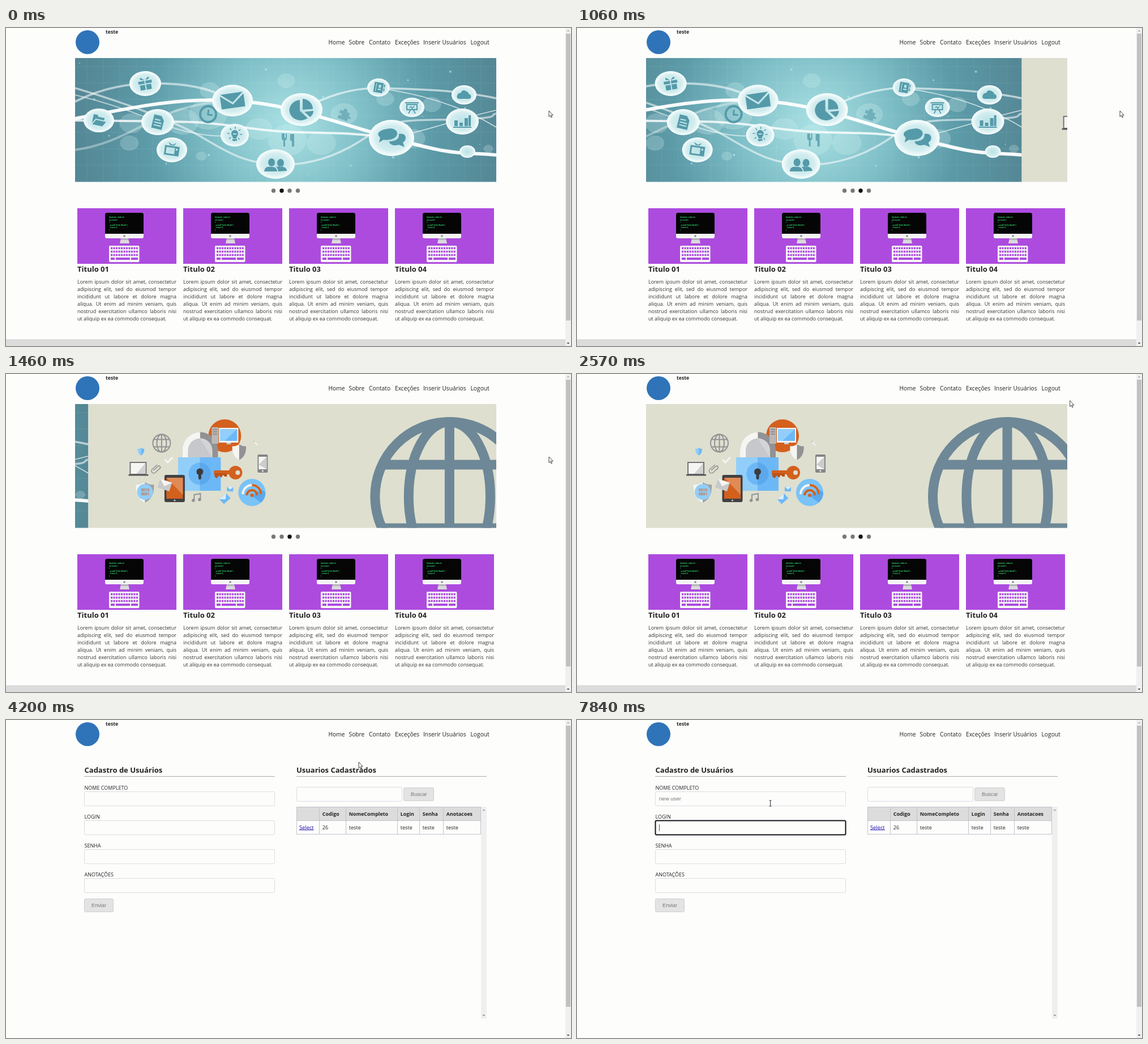
An HTML page that plays this animation: 998 by 561 pixels, repeating every 8 s.

```html
<!DOCTYPE html>
<html lang="pt">
<head>
<meta charset="utf-8">
<style>
html, body { margin: 0; width: 100%; height: 100%; overflow: hidden; background: #fdfdfc; }
svg { position: absolute; left: 0; top: 0; font-family: "Open Sans", sans-serif; fill: #222; }
p { position: absolute; top: 441px; width: 175px; margin: 0; font: 9px/13px "Open Sans", sans-serif; color: #333; text-align: justify; }
.title { font-size: 13px; font-weight: 700; }
.button { font: 9.2px "Liberation Sans", Arial, sans-serif; fill: #777; }
</style>
</head>
<body>
<div id="home"></div>
<svg id="form" width="998" height="561"></svg>
<svg id="top" width="998" height="561"></svg>
<script>
const $ = id => document.getElementById(id);
const rect = (x, y, w, h, fill, more = '') => `<rect x="${x}" y="${y}" width="${w}" height="${h}" fill="${fill}" ${more}/>`;
const disc = (x, y, r, fill, more = '') => `<circle cx="${x}" cy="${y}" r="${r}" fill="${fill}" ${more}/>`;
const path = (d, fill, more = '') => `<path d="${d}" fill="${fill}" ${more}/>`;
const line = (d, color, width, more = '') => path(d, 'none', `stroke="${color}" stroke-width="${width}" ${more}`);
const text = (x, y, s, size, more = '') => `<text x="${x}" y="${y}" font-size="${size}" ${more}>${s}</text>`;
const at = (x, y, body, turn = 0) => `<g transform="translate(${x} ${y}) rotate(${turn})">${body}</g>`;

function globe(x, y, r, w, color) {
  const R = r - w / 2, h = r * .4, c = Math.sqrt(R * R - h * h);
  return at(x, y, `<g fill="none" stroke="${color}" stroke-width="${w}"><circle r="${R}"/>
    <ellipse rx="${r * .515}" ry="${R}"/><path d="M0-${R}V${R}M-${c}-${h}H${c}M-${c} ${h}H${c}"/></g>`);
}

// Network slide
const INK = '#559aa9';
const orb = (x, y, rx, ry, icon = '', turn = 0) =>
  at(x, y, `<ellipse rx="${rx}" ry="${ry}" fill="url(#orb)"/>` +
    `<g transform="rotate(${turn})" fill="${INK}" fill-rule="evenodd"><path d="${icon}"/></g>`);

function network() {
  let s = rect(122, 53, 744, 219, 'url(#sea)');
  let grid = '';
  for (let x = 143; x < 866; x += 29) grid += `M${x} 53V272`;
  for (let y = 68; y < 272; y += 29) grid += `M122 ${y}H866`;
  s += line(grid, '#fff', .6, 'opacity=".13"');
  const ghosts = [[360,110,17],[357,152,33],[495,93,15],[597,152,23],[557,203,25],[497,198,33],[447,178,23],[670,125,15],
    [752,135,16],[312,165,28],[222,168,21],[218,203,16],[345,226,9],[852,213,8],[720,195,20]];
  for (const [x, y, r] of ghosts)
    s += `<ellipse cx="${x}" cy="${y}" rx="${r}" ry="${r * .8}" fill="#d5f3f3" opacity=".24" stroke="#fff"/>`;
  const wires = [
    ['M122 160C210 143 300 122 400 128S560 160 681 194S800 218 866 224', 6, .95],
    ['M122 163C190 164 270 164 330 166S440 182 520 184S610 185 681 194', 4, .8],
    ['M122 130C170 105 220 96 280 98S370 112 400 128', 4, .55],
    ['M122 106C210 132 300 165 350 195S430 240 485 241S590 225 640 190S730 164 806 161S850 154 866 151', 3.5, .55],
    ['M122 215C200 205 250 160 310 143S390 130 400 128', 4, .35],
    ['M522 145C560 122 610 105 658 106S790 108 866 124', 3.5, .6],
    ['M658 106C730 116 800 135 866 175', 1.5, .7],
    ['M122 118C180 132 230 150 268 166S360 195 404 189', 2, .55],
    ['M681 194C740 182 800 160 866 145', 1.5, .7]];
  for (const [d, w, a] of wires) s += line(d, '#fff', w, `opacity="${a}"`);
  for (let i = 0; i < 22; i++)
    s += disc(130 + i * 277 % 730, 62 + i * 83 % 200, 1 + i % 3 * .5, '#b8f1f6', 'opacity=".6"');
  s += at(357, 152, `<circle r="14" fill="none" stroke="${INK}" stroke-width="4"/>` + line('M0-8V1H8', INK, 3), 5);
  s += path('M487 186V194Q487 198 490 198V209H493V198Q496 198 496 194V186H494V194H492V186ZM502 187H509V209H505V199H502Z', INK, 'opacity=".8"');
  s += at(597, 153, path('M-9-6H-3Q-5-11 0-11 5-11 3-6H9V0Q14-1 13 4L9 3V9H-9V3Q-4 4-4 1T-9 0Z', INK, 'opacity=".6"'), 20);
  s += orb(246, 98, 28, 22, 'M-12-5H-1V0H-12ZM1-5H12V0H1ZM-10 2H-1V11H-10ZM1 2H10V11H1ZM-1-6Q-9-15-8-8ZM1-6Q9-15 8-8Z', -10);
  s += orb(400, 128, 36, 28, 'M-20-13H20L0 3ZM-21-10V13H21V-10L0 7Z', -8);
  s += orb(164, 163, 27, 21, 'M-11-9H-4L-2-6H9V-2H-6L-11 7ZM-5 0H13L8 9H-10Z', 12);
  s += orb(268, 166, 29, 23, 'M-9-12H4L10-5V12H-9ZM-6-5V-3H4V-5ZM-6 0V2H7V0ZM-6 5V7H7V5Z', 14);
  s += orb(293, 215, 27, 22, 'M-13-7H13V10H-13ZM-10-4V7H5V-4ZM7-3V0H10V-3ZM-4-8L-8-13 0-9 6-13 3-8Z', 8);
  s += orb(404, 189, 25, 20, 'M-4 7H4V10H-4ZM-3 6C-3 2-6 1-6-3A6 6 0 0 1 6-3C6 1 3 2 3 6ZM-3-3V-1H3V-3Z');
  s += disc(404, 187, 11, 'none', `stroke="${INK}" stroke-width="4" stroke-dasharray="1.5 7.14"`);
  s += orb(522, 144, 37, 29, 'M-3-17V2L11 15A20 18 0 1 1-3-17ZM2-19A19 18 0 0 1 20-1L2 0ZM5 4L21 2Q21 9 15 13Z');
  s += orb(476, 240, 34, 26, 'M-7-10A6 7 0 1 1-7 4A6 7 0 1 1-7-10ZM-20 13Q-19 3-8 5 2 4 3 13ZM9-9A6 7 0 1 1 9 5A6 7 0 1 1 9-9ZM5 13Q4 7 1 5 19 2 20 12Z');
  s += orb(658, 105, 20, 16, 'M-8-9H8V9H-8ZM-5-7V7H-4V-7ZM0-5V0H4V-5ZM-1 2V4H5V2ZM9-7H11V-2H9ZM9 0H11V5H9Z', 10);
  s += orb(717, 140, 22, 17, 'M-12-9H12V-7H-12ZM-10-6H10V5H-10ZM-8-4V3H8V-4ZM-6 1L-2-2 1 0 6-4 1 3-2 0ZM-4 5H-2L-5 11H-7ZM2 5H4L7 11H5Z');
  s += orb(809, 118, 22, 17, 'M-9 7Q-14 6-12 1T-6-3Q-3-10 3-7T8-2Q14 0 12 5 11 7 9 7Z');
  s += orb(806, 165, 29, 23, 'M-16 9H16V11H-16ZM-14-2H-8V8H-14ZM-5 2H1V8H-5ZM4-6H10V8H4ZM11-11H15V8H11Z');
  s += orb(681, 194, 40, 32, 'M-8-16C8-20 16-7 5 0-2 4-10 4-14 3L-22 8-20-1C-28-7-22-14-8-16ZM13-7C27-10 28 4 20 8L23 16 13 12C3 15-4 11-4 6 8 6 14 1 13-7Z');
  return s + orb(815, 218, 14, 11);
}

// Security slide, drawn at its resting place
function security() {
  const ORANGE = '#d4601d', SKY = '#6cb8f7', PALE = '#91cef9', GREY = '#929294', WHITE = '#f5f5f2';
  const shield = (x, y, k, left, right) => at(x, y, `<g transform="scale(${k})">` +
    path('M0-18Q-8-13-16-14Q-17 10 0 18Z', left) + path('M0-18Q8-13 16-14Q17 10 0 18Z', right) + '</g>');
  const mail = (x, y, k, turn, a, b) => at(x, y, `<g transform="scale(${k})">` +
    rect(-11, -8, 22, 16, a) + path('M-11-8H11L0 2Z', b) + '</g>', turn);
  return rect(122, 53, 744, 219, '#dedfcf') +
    globe(760, 216, 140, 17, '#6e8897') +
    disc(363, 109, 29, ORANGE) +
    path('M288 148V134A31.500 31.500 0 0 1 351 134V148Z', GREY) +
    path('M288 148V134A31.500 31.500 0 0 1 319.500 102.500V148Z', WHITE) +
    path('M298 148V135A21.500 21.500 0 0 1 341 135V148Z', '#c7c8cb') +
    path('M319 113.500A21.500 21.500 0 0 1 341 135V148Z', '#d3d4d6') +
    rect(281, 147, 75, 59, SKY) + rect(281, 147, 38, 59, PALE) +
    disc(319, 176, 19.500, '#5ba8ed') + path('M319 156.500A19.500 19.500 0 0 0 319 195.500Z', SKY) +
    disc(319, 172.500, 6, '#3b3b3d') + rect(316.500, 174, 5, 12, '#3b3b3d', 'rx="2"') +
    rect(340, 94, 12, 29, '#b8b8b9') + line('M342 98H350M342 102H350M342 106H350', '#666', 1) +
    rect(353, 95, 34, 26, WHITE) + rect(355, 97, 30, 21, SKY) + path('M355 97H385L363 118H355Z', PALE) + rect(366, 121, 8, 3, '#ccc') +
    globe(251.500, 122, 16.500, 2, GREY) + shield(215, 137, .37, PALE, SKY) +
    line('M257 151L262 156 271 147', WHITE, 3) +
    rect(195, 155, 30, 22, '#757577') + rect(197, 157, 26, 19, WHITE) + path('M223 157V176H207Z', '#d2d2d3') + rect(193, 177, 35, 2.500, '#545456') +
    at(242, 167, line('M-6-1H5A2 2 0 0 1 5 4H-6A4 4 0 0 1-6-4H6', GREY, 1.500), -42) +
    shield(222, 209, 1, WHITE, '#a0a0a2') + disc(222, 208, 14, PALE) +
    text(215, 207, '0010', 6.500, `fill="${ORANGE}" font-weight="600"`) + text(215, 214, '0001', 6.500, `fill="${ORANGE}" font-weight="600"`) +
    rect(256.500, 178, 36, 48, '#414143', 'rx="3"') + rect(260, 183, 29, 37, ORANGE) +
    path('M260 183H289V213Z', '#e08a55') + disc(274.500, 223, 1.500, '#ccc') +
    mail(257, 196, 1, 18, '#c9c9ca', WHITE) +
    rect(344, 170, 29, 7, ORANGE) + path('M345 175H367V181H363L360 178 357 183 353 179 349 184 345 181Z', '#bd5217') +
    disc(382, 174, 12, ORANGE) + disc(386, 174, 4, '#dedfcf') +
    shield(388.500, 138, .76, WHITE, GREY) +
    rect(421, 142, 18, 32, '#858587', 'rx="2"') + rect(423, 146, 14, 22, WHITE) + path('M437 146V168L423 160Z', '#ccc') + disc(430, 171, 1.500, '#eee') +
    line('M415 119L421 126', '#f1f1ea', 2.500) + disc(415, 119, 1.500, '#c9c9bd') +
    line('M309 223V213L320 211V221', GREY, 2) + disc(307.500, 223, 2.800, GREY) + disc(318.500, 221.500, 2.800, GREY) +
    mail(363.500, 220, .72, -42, SKY, '#d9effc') + mail(372.500, 203, .5, 5, SKY, '#d9effc') +
    disc(411, 209, 24, '#79c3f8') + path('M411 215L427 227A24 24 0 0 0 435 209L427 203Z', '#5aa9eb') +
    line('M395 212A16 16 0 0 1 427 212', WHITE, 4) + line('M411 196A16 16 0 0 1 427 212', ORANGE, 4) +
    line('M402 214A9 9 0 0 1 420 214', ORANGE, 4) + disc(411, 214, 3, ORANGE);
}

function card() {
  const code = ['#include &lt;stdio.h&gt;', 'int main()', '{', '  printf("Hello World");', '  return 0;', '}'];
  const row = y => line(`M185 ${y}H233`, '#ad4bdf', 3.600, 'stroke-dasharray="3.200 1.270"');
  return rect(126, 318, 175, 98, '#ad4bdf') +
    rect(175, 326, 68, 45, '#f4f4f4', 'rx="3"') + path('M175 363V329Q175 326 178 326H240Q243 326 243 329V363Z', '#050505') +
    code.map((c, i) => text(182, 335 + i * 4.600, c, 3, 'fill="#2fd36a" font-weight="700" style="white-space:pre"')).join('') +
    disc(209, 367, 1.800, '#888') + path('M203 371H216L218 380H201Z', '#d9d9dc') + rect(203, 371, 13, 3, '#b4b4b8') +
    rect(182, 384, 53.500, 29, '#f6f6f6', 'rx="2"') + [388.500, 394.500, 400.500].map(row).join('') +
    rect(185, 405, 7, 4, '#ad4bdf') + rect(194, 405, 25, 4, '#ad4bdf') + rect(221, 405, 12, 4, '#ad4bdf');
}

const xs = [126, 313, 500, 687];
const arrow = (x, y, dir, color) => path(`M${x - 2.500} ${y + dir}H${x + 2.500}L${x} ${y - 1.500 * dir}Z`, color);

$('home').innerHTML = `<svg width="998" height="561"><defs>
  <radialGradient id="sea" gradientUnits="userSpaceOnUse" cx="500" cy="170" r="370">
    <stop offset="0" stop-color="#a9e1e4"/><stop offset=".35" stop-color="#80c0c8"/>
    <stop offset=".68" stop-color="#5c9ba8"/><stop offset="1" stop-color="#558896"/></radialGradient>
  <radialGradient id="orb"><stop offset="0" stop-color="#b9e2e6"/><stop offset=".7" stop-color="#d3edef"/><stop offset="1" stop-color="#fafefe"/></radialGradient>
  <clipPath id="frame">${rect(122, 53, 744, 218.500, '#000')}</clipPath><g id="card">${card()}</g></defs>
  <g clip-path="url(#frame)"><g id="slides"><g>${network()}</g><g transform="translate(744)">${security()}</g></g></g>
  ${[472.500, 487, 501, 515.500].map((x, i) => disc(x, 287, 3.700, '#787878', `id="dot${i}"`)).join('')}
  ${xs.map((x, i) => `<use href="#card" x="${x - 126}"/>` + text(x, 430, 'Titulo 0' + (i + 1), 13, 'class="title"')).join('')}
  ${rect(0, 549, 988, 12, '#dcdcdc')}</svg>` +
  xs.map(x => `<p style="left:${x}px">Lorem ipsum dolor sit amet, consectetur adipiscing elit, sed do eiusmod tempor incididunt ut labore et dolore magna aliqua. Ut enim ad minim veniam, quis nostrud exercitation ullamco laboris nisi ut aliquip ex ea commodo consequat.</p>`).join('');

const box = (x, y, w, h, fill, stroke, more = '') => rect(x + .5, y + .5, w, h, fill, `rx="2" stroke="${stroke}" ${more}`);
const cols = [513.500, 553.500, 600.500, 691.500, 730.500, 772.500, 838.500];
const fields = ['NOME COMPLETO', 'LOGIN', 'SENHA', 'ANOTAÇÕES'];
$('form').innerHTML =
  text(138.500, 92.500, 'Cadastro de Usuários', 13, 'class="title"') + text(513, 92.500, 'Usuarios Cadastrados', 13, 'class="title"') +
  line('M138 99.500H475M513 99.500H849', '#aaa', 1) +
  fields.map((f, i) => text(138.500, 122.800 + i * 51.100, f, 9) + box(138, 126 + i * 51, 336, 25, '#fdfdfc', '#dcdce2')).join('') +
  [0, 1].map(i => box(138, 126 + i * 51, 336, 25, 'none', '#14141a', `id="ring${i}" stroke-width="2"`)).join('') +
  box(138, 315, 51, 23, '#e3e3e3', '#cfcfcf') + text(151, 330, 'Enviar', 9.200, 'class="button"') +
  box(513, 118, 186, 25, '#fdfdfc', '#dcdce2') + box(702, 119, 53, 23, '#e3e3e3', '#cfcfcf') + text(715, 134.300, 'Buscar', 9.200, 'class="button"') +
  rect(513, 153, 326, 24.500, '#dcdcdc') +
  line(cols.map(x => `M${x} 153V201.500`).join('') + 'M513 153.500H839M513 177.500H839M513 201.500H839', '#c2c2cc', 1) +
  ['Codigo', 'NomeCompleto', 'Login', 'Senha', 'Anotacoes'].map((h, i) =>
    text(cols[i + 1] + 5.300, 169, h, 8.850, 'font-weight="700"') + text(cols[i + 1] + 5.300, 192.500, i ? 'teste' : '26', 9.100)).join('') +
  text(518, 192.500, 'Select', 9.300, 'fill="#1a0dab" text-decoration="underline"') +
  rect(839, 153, 10, 374, '#efefef') + arrow(844, 159, 1, '#999') + arrow(844, 521, -1, '#888') +
  text(145, 142.300, '', 9.600, 'id="typed" fill="#777" font-family="Liberation Sans, Arial, sans-serif" style="white-space:pre"') +
  rect(0, 0, 1, 12, '#555', 'id="caret"');

const links = [[569.500, 'Home'], [605.500, 'Sobre'], [641, 'Contato'], [687, 'Exceções'], [737, 'Inserir Usuários'], [820.500, 'Logout']];
$('top').innerHTML = disc(144, 25, 21, '#2f74b8') + text(176, 10, 'teste', 8.700, 'font-weight="700"') +
  links.map(([x, s]) => text(x, 28.500, s, 10.250)).join('') +
  rect(988, 0, 10, 561, '#f0f0f0') + rect(989, 10, 8, 506, '#c1c1c1', 'id="thumb"') +
  arrow(993, 5, 1, '#aaa') + arrow(993, 556, -1, '#444') +
  '<g id="mouse"><g id="arrow">' + path('M0 0V10.500L2.400 8.300 4 12 5.600 11.300 4 7.700H7.200Z', '#fff', 'stroke="#333" stroke-width=".9"') + '</g><g id="hand">' +
  path('M-1 1Q0-.5 1 1V5L5 6Q7 6 6.500 9L5 13H-1L-4 8.500Q-4.500 7-3 7L-1 9Z', '#fff', 'stroke="#333" stroke-width=".9"') + '</g><g id="beam">' +
  line('M-2-5H2M-2 5H2M0-5V5', '#333', 1) + '</g></g>';

const clamp = v => Math.max(0, Math.min(1, v));

// CSS "ease" curve
function ease(p) {
  const bez = (a, b, u) => 3 * a * u * (1 - u) ** 2 + 3 * b * u * u * (1 - u) + u ** 3;
  let lo = 0, hi = 1;
  for (let i = 0; i < 20; i++) {
    const mid = (lo + hi) / 2;
    if (bez(.25, .25, mid) < p) lo = mid; else hi = mid;
  }
  return bez(.1, 1, lo);
}

// time, x, y
const track = [[1670, 959, 146], [2070, 871, 47], [2570, 871, 47], [3000, 788, 21], [4030, 788, 21], [4200, 624, 74], [4800, 341.500, 147]];
function mouseAt(t) {
  let i = track.findIndex(k => k[0] > t);
  if (i === 0) return track[0].slice(1);
  if (i < 0) return track.at(-1).slice(1);
  const [a, x, y] = track[i - 1], [b, X, Y] = track[i];
  let p = (t - a) / (b - a);
  p = a === 4030 ? p : 1 - (1 - p) ** 2;
  return [x + (X - x) * p, y + (Y - y) * p];
}

const SWITCH = 4030, FOCUS = 5170, TAB = 7690;
const keys = [6670, 6740, 6800, 6970, 7170, 7270, 7470, 7570];
const show = (id, on) => $(id).style.display = on ? '' : 'none';

function draw(now) {
  const t = now % 8000, home = t < SWITCH;
  show('home', home);
  show('form', !home);
  $('thumb').setAttribute('height', home ? 506 : 496);

  $('slides').setAttribute('transform', `translate(${-744 * ease(clamp((t - 996) / 600))})`);
  for (let i = 0; i < 4; i++) $('dot' + i).setAttribute('fill', i === (t < 996 ? 1 : 2) ? '#111' : '#787878');

  const [x, y] = mouseAt(t);
  const hand = y < 33 && x > 737 && x < 813, beam = !home && x < 475 && y > 126;
  $('mouse').setAttribute('transform', `translate(${x} ${y})`);
  show('hand', hand);
  show('beam', beam);
  show('arrow', !hand && !beam);

  const tabbed = t >= TAB, typing = t >= keys[0];
  $('ring0').style.opacity = tabbed ? 1 - clamp((t - TAB) / 120) : clamp((t - FOCUS) / 170);
  $('ring1').style.opacity = clamp((t - TAB) / 120);
  $('typed').textContent = 'new user'.slice(0, keys.filter(k => t >= k).length);
  show('caret', t >= FOCUS + 30 && (typing || (t - FOCUS - 30) % 1000 < 500));
  const end = tabbed || home ? 0 : $('typed').getComputedTextLength();
  $('caret').setAttribute('x', 145 + end);
  $('caret').setAttribute('y', tabbed ? 184 : 133);
}

const start = performance.now();
(function tick() {
  draw(performance.now() - start);
  requestAnimationFrame(tick);
})();
</script>
</body>
</html>
```
